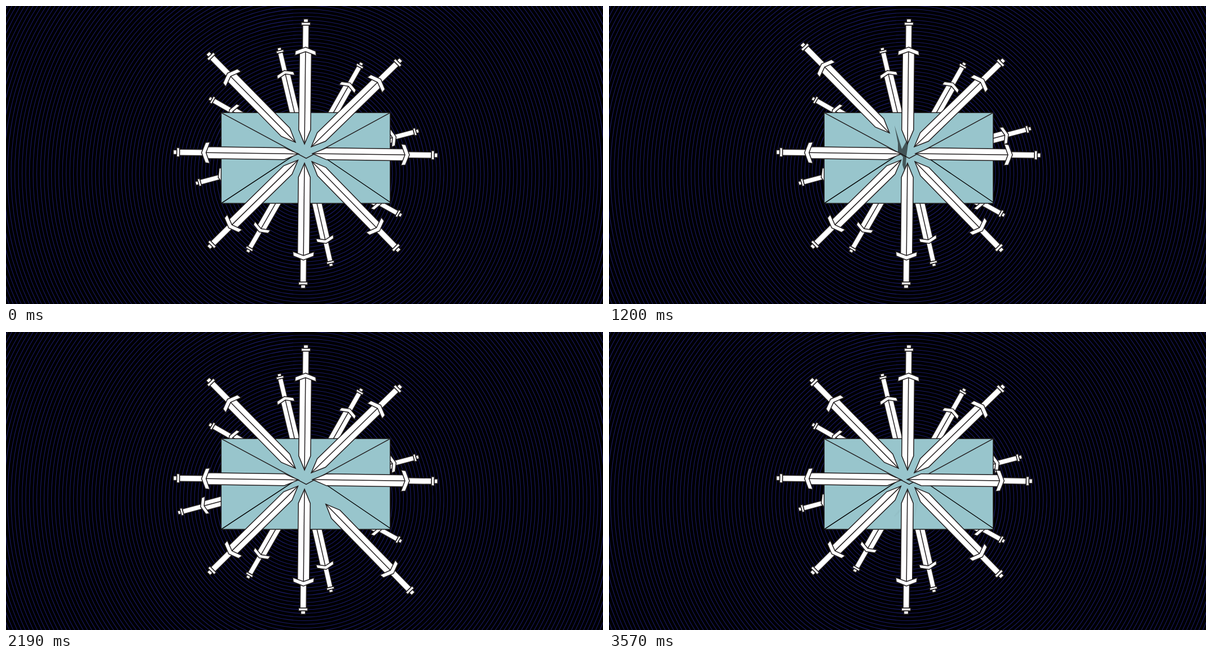
An HTML page for the animation above (3600 ms loop, 1058x529 px).

```html
<!DOCTYPE html>
<html lang="en">
<head>
<meta charset="utf-8">
<title>Swords around an envelope</title>
<style>
  html, body { margin: 0; width: 100%; height: 100%; overflow: hidden; background: #000; }
  svg { display: block; width: 100vw; height: 100vh; }
  .ink { stroke: #231f20; stroke-width: 1.5; stroke-linejoin: miter; }
  .sword { fill: #fff; }
</style>
</head>
<body>
<svg viewBox="0 0 1058 529" preserveAspectRatio="none">
  <rect width="1058" height="529" fill="#000"/>
  <g id="rings" fill="none" stroke="#1a1a66" stroke-width="1.1"></g>
  <g id="back"></g>
  <g class="ink" fill="none">
    <rect x="381.3" y="189.3" width="299.6" height="161" fill="#98c5cc"/>
    <path d="M381.3 350.3L515 262M681 348.5L551 260" stroke="#000"/>
    <path d="M381.3 189.3L532 270.5L681 189.3"/>
  </g>
  <path id="crackA" fill="#0a0a0a" d="M506 212L514 238L519 254L528 238L530 246L527 267L525 297L520 282L521 268L512 259L512 243Z"/>
  <path id="crackB" fill="#0a0a0a" d="M571 239L564 252L559 266L558 277L549 294L547 308L539 340L543 302L538 298L507 328L505 326L536 291L548 277L551 263L556 252L558 245L561 251Z"/>
  <g id="front"></g>
</svg>
<script>
const LOOP = 3600, PULL = 700, STAB = 200, STRIKE = 920, DEPTH = 0.36;
const NS = 'http://www.w3.org/2000/svg';
const byId = id => document.getElementById(id);

function add(parent, name, attrs) {
  const el = document.createElementNS(NS, name);
  for (const key in attrs) el.setAttribute(key, attrs[key]);
  parent.appendChild(el);
  return el;
}

for (let r = 6.5; r < 620; r += 6.5) add(byId('rings'), 'circle', { cx: 529, cy: 298, r });

// Drawn from the pommel (0, 0) towards the tip (222, 0).
const PARTS = [
  'M58 -10.5H197L222 0L197 10.5H58Z',
  'M58 0H222',
  'M11 -5.5H54V5.5H11Z',
  'M50 0L57 -18L65 -19L58 0L65 19L57 18Z',
  'M6 -8H11V8H6Z',
  'M0 -4H6V4H0Z'
];

// Each sword: pommel, a point on its axis, then start time and pull vector if it moves.
const FRONT = [
  { end: [531.5, 23], axis: [529, 246] },
  { end: [700, 95], axis: [541, 250] },
  { end: [526.5, 501], axis: [529, 279] },
  { end: [359, 429], axis: [517, 274] },
  { end: [296.5, 259.5], axis: [517, 262.5], start: 0, pull: [-29, -0.4], rise: 600 },
  { end: [357.5, 83.5], axis: [513, 242], start: 800, pull: [-26, -27] },
  { end: [697, 435], axis: [541, 275], start: 1795, pull: [41, 49] },
  { end: [765, 265], axis: [543, 262], start: 2725, pull: [44, 0.6] }
];
const BACK = [
  { end: [484, 74], axis: [511, 188] },
  { end: [360, 163.5], axis: [401, 187] },
  { end: [701, 372], axis: [658, 348] },
  { end: [576.5, 462], axis: [551, 350] },
  { end: [630.5, 100.5], axis: [581, 188], start: 15, pull: [17, -28] },
  { end: [731.5, 221.5], axis: [686, 233.5], start: 800, pull: [27, -7] },
  { end: [336, 315], axis: [379, 303.5], start: 1795, pull: [-52, 10] },
  { end: [428, 437], axis: [478, 350], start: 2725, pull: [-20, 34] }
];

function build(parent, scale, sword) {
  const [x, y] = sword.end, [ax, ay] = sword.axis;
  const turn = Math.atan2(ay - y, ax - x) * 180 / Math.PI;
  sword.el = add(parent, 'g', { class: 'ink sword' });
  const body = add(sword.el, 'g', {
    transform: `translate(${x} ${y}) rotate(${turn}) scale(${scale})`,
    'stroke-width': 1.5 / scale
  });
  for (const d of PARTS) add(body, 'path', { d });
}
BACK.forEach(s => build(byId('back'), 0.83, s));
FRONT.forEach(s => build(byId('front'), 1, s));

const moving = [...BACK, ...FRONT].filter(s => s.pull);

// Slow pull out, fast stab past the rest place, then a snap back.
function reach(t, rise = PULL) {
  if (t <= 0 || t >= STRIKE) return 0;
  if (t < PULL) return (1 - Math.cos(Math.PI * Math.min(t / rise, 1))) / 2;
  const u = Math.min((t - PULL) / STAB, 1);
  return 1 - (1 + DEPTH) * (1 - (1 - u) ** 3);
}

const fade = t => t < 0 ? 0 : Math.max(0, 1 - t / 1000);

function draw(t) {
  for (const s of moving) {
    const k = reach(t - s.start, s.rise);
    s.el.setAttribute('transform', `translate(${s.pull[0] * k} ${s.pull[1] * k})`);
  }
  byId('crackA').setAttribute('opacity', fade(t - 795));
  byId('crackB').setAttribute('opacity', fade(t - 2595));
}

const begin = performance.now();
function tick() {
  draw((performance.now() - begin) % LOOP);
  requestAnimationFrame(tick);
}
draw(0);
requestAnimationFrame(tick);
</script>
</body>
</html>
```
